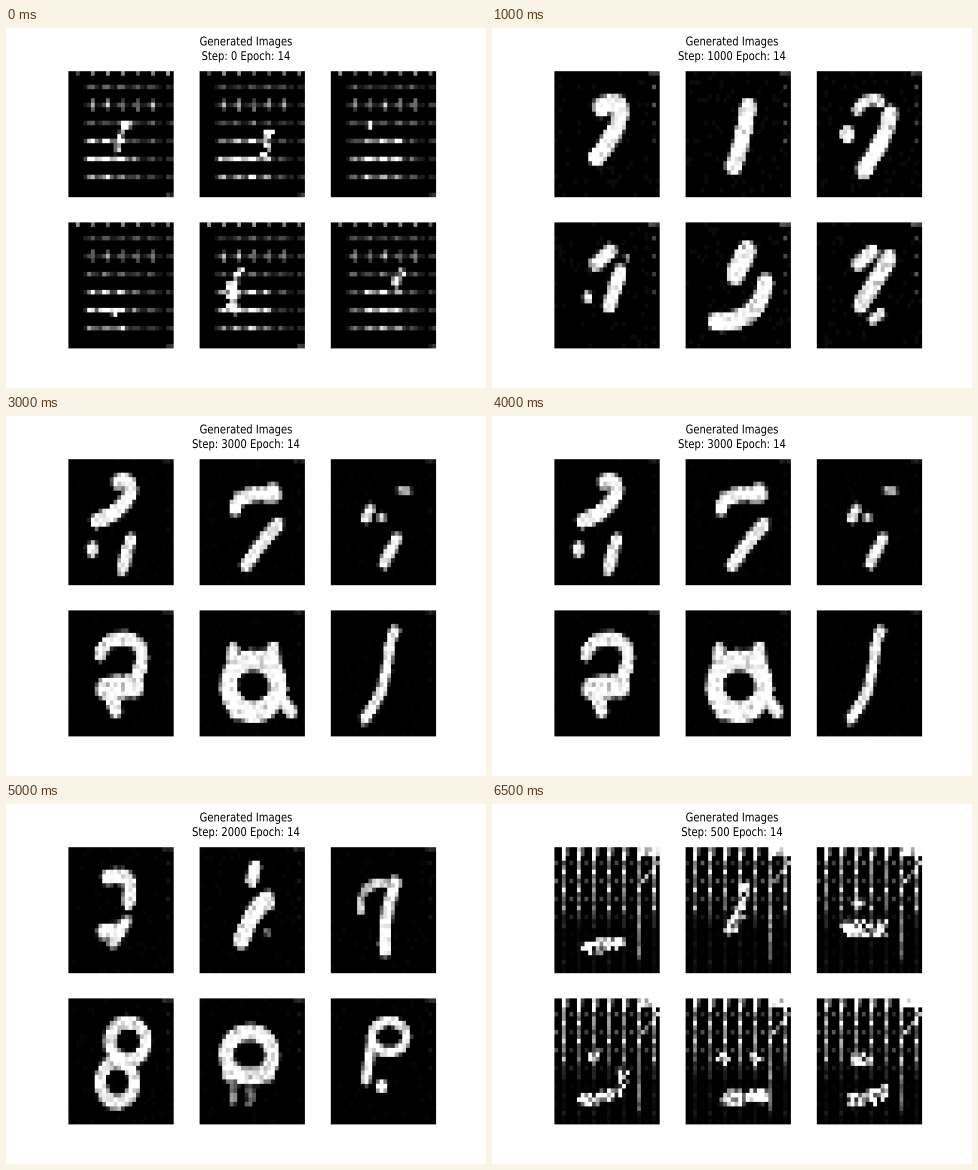
Write a matplotlib script that moves like this. It is 480 px wide and 360 px high and loops after 7 s.

```python
import numpy as np
import matplotlib.pyplot as plt
from matplotlib.animation import FuncAnimation
from matplotlib.patches import PathPatch
from matplotlib.textpath import TextPath
from matplotlib.transforms import Affine2D

W, H, N = 480, 360, 28
gy, gx = np.mgrid[0:N, 0:N]
fields = {}


def near(xs, ys, r, cap):
    """Soft brightness field of a pen of radius r along sampled points."""
    d = np.hypot(gx[..., None] + 0.5 - xs, gy[..., None] + 0.5 - ys).min(axis=2)
    return np.clip((r - d + 0.6) * 1.3, -2, cap)


def stroke(r, *pts, cap=1):
    """Bezier curve over the given control points."""
    t = np.linspace(0, 1, 40)[:, None]
    layer = [np.array(p) + 0 * t for p in pts]
    while len(layer) > 1:
        layer = [a + t * (b - a) for a, b in zip(layer, layer[1:])]
    return near(layer[0][:, 0], layer[0][:, 1], r, cap)


def ring(r, x, y, rx, ry):
    a = np.linspace(0, 2 * np.pi, 80)
    return near(x + rx * np.cos(a), y + ry * np.sin(a), r, 1)


def draw(step, panel, *parts):
    fields[step, panel] = np.max(parts, axis=0)


draw(0, 0, stroke(0.7, (15, 12), (13, 17)))
draw(0, 1, stroke(0.6, (18.4, 14), (17.5, 19)))
draw(0, 2, stroke(0.5, (10, 12), cap=0.4))
draw(0, 3, stroke(0.6, (12.5, 20)))
draw(0, 4, stroke(0.8, (10.5, 11), (8.2, 14), (9, 19)))
draw(0, 5, stroke(0.5, (18.8, 11.3), (17, 13.3), cap=0.8))

draw(500, 0, stroke(1, (9, 22.5), (17.5, 21.3)))
draw(500, 1, stroke(1, (15.5, 9), (14.8, 15), (12, 18.5)))
draw(500, 2, stroke(1.2, (8.5, 18), (17, 18)), stroke(0.8, (11, 12.5)))
draw(500, 3, stroke(1, (7.5, 22.5), (18, 22.5), (18.3, 17)), stroke(0.9, (10.5, 13)))
draw(500, 4, stroke(1.1, (11, 22.3), (21, 21.5)),
     stroke(1, (10, 13)), stroke(1.1, (18.5, 13.5)))
draw(500, 5, stroke(1.1, (9.5, 22.5), (18, 21)), stroke(0.9, (10, 13.5), (14, 13.5)))

draw(1000, 0, stroke(1.9, (12.5, 8), (21, 4), (17.5, 13.5), (11.3, 19)))
draw(1000, 1, stroke(1.9, (16.6, 8), (15.5, 15), (12.8, 21)))
draw(1000, 2, stroke(1, (10.7, 8.5), (14, 5), (17, 7)), stroke(1.7, (8.2, 14)),
     stroke(1.8, (19.5, 9.5), (19, 14), (12.5, 22)))
draw(1000, 3, stroke(1.4, (11, 9.2), (15, 6.3)), stroke(1, (8.8, 16.6)),
     stroke(1.5, (17.5, 11), (14.6, 18.5)), stroke(0.5, (19.4, 8), cap=0.5))
draw(1000, 4, stroke(2.2, (16.2, 6.5), (13.3, 11.5)),
     stroke(1.9, (21.2, 13.5), (19.5, 22.5), (8, 22)))
draw(1000, 5, stroke(1.4, (11, 9.2), (14.8, 6.5)), stroke(1.8, (19.3, 8), (11.7, 18.2)),
     stroke(0.9, (14.8, 21.5), (17, 20.3)))

draw(2000, 0, stroke(1.5, (10.5, 6.8), (18, 5), (16, 12)),
     stroke(1.6, (9.5, 18.8), (13.5, 18.5)), stroke(1, (15.5, 16.5), (12, 21.3)))
draw(2000, 1, stroke(1.3, (14.8, 4.5), (13.9, 7.3)), stroke(0.8, (18.2, 19), cap=0.4),
     stroke(1.9, (18, 11.8), (14, 13.5), (11.3, 20.5)))
draw(2000, 2, stroke(0.7, (8, 14), (7.5, 8), (14, 8), cap=0.8),
     stroke(1.3, (17, 8), (13.8, 16), (14.5, 23)))
draw(2000, 3, ring(1.3, 15.8, 9.5, 4.8, 4.2), ring(1.3, 13, 18.6, 4.4, 4.6))
draw(2000, 4, ring(1.6, 13.3, 12.5, 6.2, 5), stroke(1.3, (7.5, 17), (18.5, 17)),
     stroke(0.6, (9.3, 18), (9.3, 23), cap=0.5), stroke(0.6, (13.5, 18), (13.5, 23), cap=0.5))
draw(2000, 5, ring(0.9, 15.5, 8.5, 4.6, 3.4), stroke(1, (10.8, 10), (9.3, 18)),
     stroke(1.3, (13.5, 19.6)))

draw(3000, 0, stroke(1.5, (13.3, 5), (20, 4), (16, 11.5), (7.5, 13.8)),
     stroke(1.4, (6.3, 20)), stroke(1.3, (16.5, 18), (14.3, 24.3)))
draw(3000, 1, stroke(1.4, (9.5, 11), (10, 7), (20, 8)), stroke(1.8, (19.5, 7.3)),
     stroke(1.3, (20.8, 14.5), (16, 19), (12.4, 23.5)))
draw(3000, 2, stroke(1, (9.4, 13), (10.5, 11)), stroke(0.9, (13.5, 13)),
     stroke(1.1, (17.5, 17.7), (14.2, 23)), stroke(0.6, (18.5, 6.7), (20.5, 7.3), cap=0.5))
draw(3000, 3, stroke(1.4, (8.5, 9.5), (11, 4), (24, 5), (18, 15)),
     stroke(2.3, (10, 17.3), (17.5, 16.8)), stroke(1.6, (11.5, 19), (12.5, 22)))
draw(3000, 4, ring(2.1, 14.3, 16.8, 6.6, 5.8), stroke(1.4, (9, 9), (9, 14)),
     stroke(1.5, (19.5, 8.8), (20, 13)), stroke(1.3, (22, 20), (24.3, 22.5)),
     stroke(1.3, (9.3, 22.8)))
draw(3000, 5, stroke(1.1, (17, 4.7), (14, 9), (16.5, 17), (9, 24)))

# in-between steps morph two neighbouring drawings
for step, a, b in [(1500, 1000, 2000), (2500, 2000, 3000), (3500, 3000, 2000)]:
    for p in range(6):
        fields[step, p] = fields[a, p] + fields[b, p] + 1.2


def backdrop(step, panel):
    """Grid artefacts that fade out as training goes on."""
    rng = np.random.default_rng(step + panel)
    jitter = rng.uniform(0.5, 1.3, (N, N))
    inner = (gx > 3) & (gx < 25)
    comb = gx % 4 == 2
    if step == 0:
        dash = np.where(np.isin(gx % 4, (1, 2)), 0.32, 0.12) * inner
        out = dash * (gy % 4 == 3) * (gy < 25)
        out += 0.35 * comb * inner * np.isin(gy, (6, 7, 8))
        out += 0.5 * comb * (gy == 0) + 0.2 * (gx > 25) * (gy % 4 == 3)
        cx = 10 + panel % 3 * 1.5
        glow = np.exp(-((gx - cx) / 6) ** 4 - ((gy - 18.5) / 4.5) ** 2)
        return out * (1 + 5 * glow) * jitter
    if step == 500:
        out = comb * np.where(gy % 4 == 1, 1.1, 0.5)
        out += 0.6 * comb * (gy < 3) + 0.3 * (gx % 4 == 3) * (gy < 2)
        out += 0.3 * (gx % 4 == 0) * (gy % 4 == 3)
        out *= np.clip((18 - gy) / 8, 0.08, 1)
        out += 0.4 * (gx == 22) * (gy > 13) * (gy < 25)
        out += (gx > 22) * (gy < 2) + 0.7 * (gx + gy == 30) * (gy < 8)
        return out * jitter
    k = 1000 / step
    out = 0.04 * k * (rng.random((N, N)) > 0.92)
    out += 0.3 * k * jitter * (gx > 24) * (gy < 1)
    return out + 0.3 * k ** 2 * jitter * (gx == 26) * (gy % 4 == 3) * (gy < 16)


def cells(step, panel):
    rough = 0.6 if step < 1000 else 0.12
    noise = np.random.default_rng(90 + step + panel).normal(0, rough, (N, N))
    ink = fields[step, panel]
    ink = ink + noise * (ink > -0.5)
    return np.clip(np.maximum(ink, backdrop(step, panel)), 0, 1)


def cover(size, start, length):
    """Share of each stage pixel covered by each of the N cells."""
    edge = start + length * np.arange(N + 1) / N
    p = np.arange(size)[:, None]
    return np.clip(np.minimum(p + 1, edge[1:]) - np.maximum(p, edge[:-1]), 0, 1)


cols = [cover(W, 62.4 + 131.2 * i, 105.3) for i in range(3)]
rows = [cover(H, 43.2 + 151.2 * j, 126) for j in range(2)]


def stage(step):
    img = np.ones((H, W))
    for p in range(6):
        img += rows[p // 3] @ (cells(step, p) - 1) @ cols[p % 3].T
    return np.clip(img, 0, 1)


pictures = {s: stage(s) for s in range(0, 4000, 500)}

fig = plt.figure(figsize=(4.8, 3.6), dpi=100, facecolor="white")
ax = fig.add_axes([0, 0, 1, 1])
ax.axis("off")
view = ax.imshow(pictures[0], cmap="gray", vmin=0, vmax=1, aspect="auto",
                 interpolation="nearest", extent=(0, W, H, 0))


def title_path(text, base):
    # an 8:5 figure shown at 4:3, so glyphs are 10 wide by 12 high
    path = TextPath((0, 0), text, size=1, prop={"family": "DejaVu Sans"})
    box = path.get_extents()
    place = Affine2D().translate(-(box.x0 + box.x1) / 2, 0).scale(10, -12)
    return place.translate(W / 2, base).transform_path(path)


def add_title(text, base):
    return ax.add_patch(PathPatch(title_path(text, base), fc="black", lw=0))


add_title("Generated Images", 17.4)
caption = add_title("Step: 0 Epoch: 14", 32)


def update(i):
    step = 500 * min(i, 14 - i)
    view.set_data(pictures[step])
    caption.set_path(title_path(f"Step: {step} Epoch: 14", 32))
    return view, caption


anim = FuncAnimation(fig, update, frames=14, interval=500, repeat=True, repeat_delay=0)
plt.show()
```
